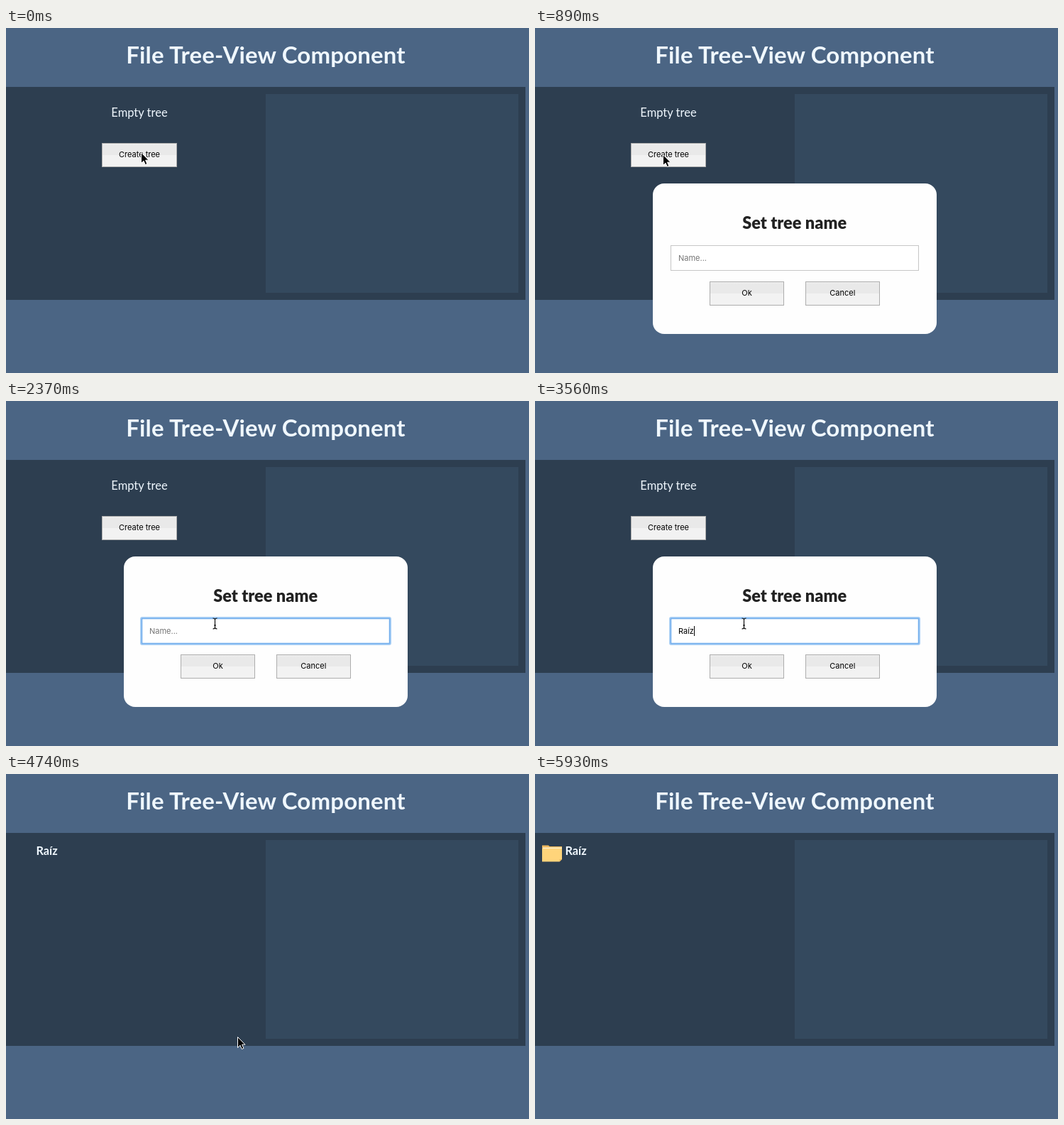
Write an HTML page that moves like this. It is 737 by 486 pixels and loops after 6380 ms.

```html
<!DOCTYPE html>
<html lang="en">
<head>
<meta charset="utf-8">
<title>File Tree-View Component</title>
<style>
  html, body { margin: 0; width: 100%; height: 100%; overflow: hidden; background: #4b6584; }
  svg { display: block; }
  text { white-space: pre; }
  .title, .label, .root, .heading { font-family: Lato, "Open Sans", sans-serif; fill: #f0f8ff; }
  .title { font-size: 33px; font-weight: 700; letter-spacing: .15px; }
  .label { font-size: 16.5px; }
  .root { font-size: 16.3px; font-weight: 700; }
  .heading { font-size: 23.5px; font-weight: 900; fill: #222; }
  .ui { font: 11px Inter, Roboto, sans-serif; fill: #000; }
  .mid { text-anchor: middle; }
  .hint { fill: #757575; }
  .button { fill: url(#face); stroke: #adadad; }
</style>
</head>
<body>
<svg width="737" height="486" viewBox="0 0 737 486">
  <defs>
    <linearGradient id="face" x2="0" y2="1">
      <stop offset="0" stop-color="#efefef"/>
      <stop offset=".1" stop-color="#e9e9e9"/>
      <stop offset=".5" stop-color="#e9e9e9"/>
      <stop offset=".5" stop-color="#f2f2f2"/>
      <stop offset="1" stop-color="#f2f2f2"/>
    </linearGradient>
  </defs>

  <rect width="737" height="486" fill="#4b6584"/>
  <text class="title mid" x="366" y="50">File Tree-View Component</text>
  <rect y="83" width="732" height="300" fill="#2d3e50"/>
  <rect x="366" y="93" width="356" height="280" fill="#34495e"/>

  <g id="empty">
    <text class="label mid" x="188" y="125">Empty tree</text>
    <rect class="button" x="135.5" y="162.5" width="105" height="33"/>
    <text class="ui mid" x="188" y="182">Create tree</text>
  </g>

  <text id="root" class="root" x="42.5" y="114">Raíz</text>
  <g id="folder">
    <path d="M10 100.5h9l1.5 1.5H38v5H10z" fill="#efb95e"/>
    <path d="M11 103.5H38v3H11z" fill="#fff0cc"/>
    <path d="M10 105H38V120L34.5 123.5H10z" fill="#ffd47a"/>
    <path d="M38 120L34.5 123.5V120z" fill="#efb95e"/>
  </g>

  <g id="dialog">
    <rect x="166" y="219" width="400" height="212" rx="16" fill="#fefefe"/>
    <text class="heading mid" x="365.7" y="283">Set tree name</text>
    <rect x="191.5" y="306.5" width="349" height="35" fill="#fff" stroke="#c6c6c6"/>
    <g id="focus" fill="none">
      <rect x="190" y="305" width="352" height="38" rx="2" stroke="#a9cff5" stroke-width="2"/>
      <rect x="191.5" y="306.5" width="349" height="35" stroke="#6facec" stroke-width="1.5"/>
    </g>
    <text id="hint" class="ui hint" x="202" y="328">Name...</text>
    <text id="typed" class="ui" x="202" y="328"></text>
    <rect id="caret" y="317" width="1" height="14"/>
    <rect class="button" x="246.5" y="357.5" width="104" height="33"/>
    <text class="ui mid" x="298.5" y="377">Ok</text>
    <rect class="button" x="381.5" y="357.5" width="104" height="33"/>
    <text class="ui mid" x="433.3" y="377">Cancel</text>
  </g>

  <path id="arrow" d="M.5 .5V15.5L4 12.2L6.3 17.5L8.9 16.4L6.6 11.2H11z"
        fill="#000" stroke="#fff" stroke-linejoin="round"/>
  <path id="beam" d="M-3-7.5q2.5 0 3 1.5q.5-1.5 3-1.5M0-6V6M-3 7.5q2.5 0 3-1.5q.5 1.5 3 1.5M-1.5 2.5h3"
        fill="none" stroke="#000" stroke-width="1.1"/>
</svg>
<script>
  const LOOP = 6380;
  const OPEN = 890, FOCUS = 1930, CONFIRM = 4740, ICON = 4890;

  // time, pointer shape, x, y
  const pointer = [
    [0, "arrow", 190, 175], [150, "arrow", 186, 175], [300, "arrow", 182, 176],
    [600, "arrow", 181, 177], [740, "arrow", 180, 178],
    [1190, "arrow", 183, 186], [1340, "arrow", 202, 226], [1490, "arrow", 244, 298],
    [1640, "arrow", 286, 360], [1780, "arrow", 303, 348], [1930, "beam", 305, 328],
    [2230, "beam", 299, 317], [2370, "beam", 294.5, 313.5],
    [4000, "beam", 296, 320], [4150, "beam", 302, 335], [4300, "arrow", 312, 352],
    [4450, "arrow", 324, 367], [4590, "arrow", 329, 373], [4740, "arrow", 326, 370],
    [5180, "arrow", 325, 368], [5330, "arrow", 324, 369], [5780, "arrow", 372, 385],
    [5930, "none", 0, 0]
  ];
  const typing = [
    [0, ""], [2820, "R"], [2970, "Ra"], [3110, "Ra´"], [3260, "Raí"], [3560, "Raíz"]
  ];

  const el = id => document.getElementById(id);
  const show = (id, on) => el(id).setAttribute("visibility", on ? "inherit" : "hidden");
  const latest = (steps, t) => steps.filter(s => s[0] <= t).pop();
  const within = (t, from, to) => t >= from && t < to;

  function draw(t) {
    const open = within(t, OPEN, CONFIRM);
    const [, name] = latest(typing, t);
    const [, shape, x, y] = latest(pointer, t);

    show("empty", t < CONFIRM);
    show("root", t >= CONFIRM);
    show("folder", t >= ICON);
    show("dialog", open);
    show("focus", t >= FOCUS);
    show("hint", !name);
    show("caret", name || within(t, FOCUS, 2370));

    const typed = el("typed");
    if (typed.textContent !== name) typed.textContent = name;
    const end = name ? typed.getComputedTextLength() : 0;
    el("caret").setAttribute("x", Math.round(202 + end));

    for (const id of ["arrow", "beam"]) {
      show(id, id === shape);
      el(id).setAttribute("transform", `translate(${x} ${y})`);
    }
  }

  const start = performance.now();
  function tick() {
    draw((performance.now() - start) % LOOP);
    requestAnimationFrame(tick);
  }
  tick();
</script>
</body>
</html>
```
